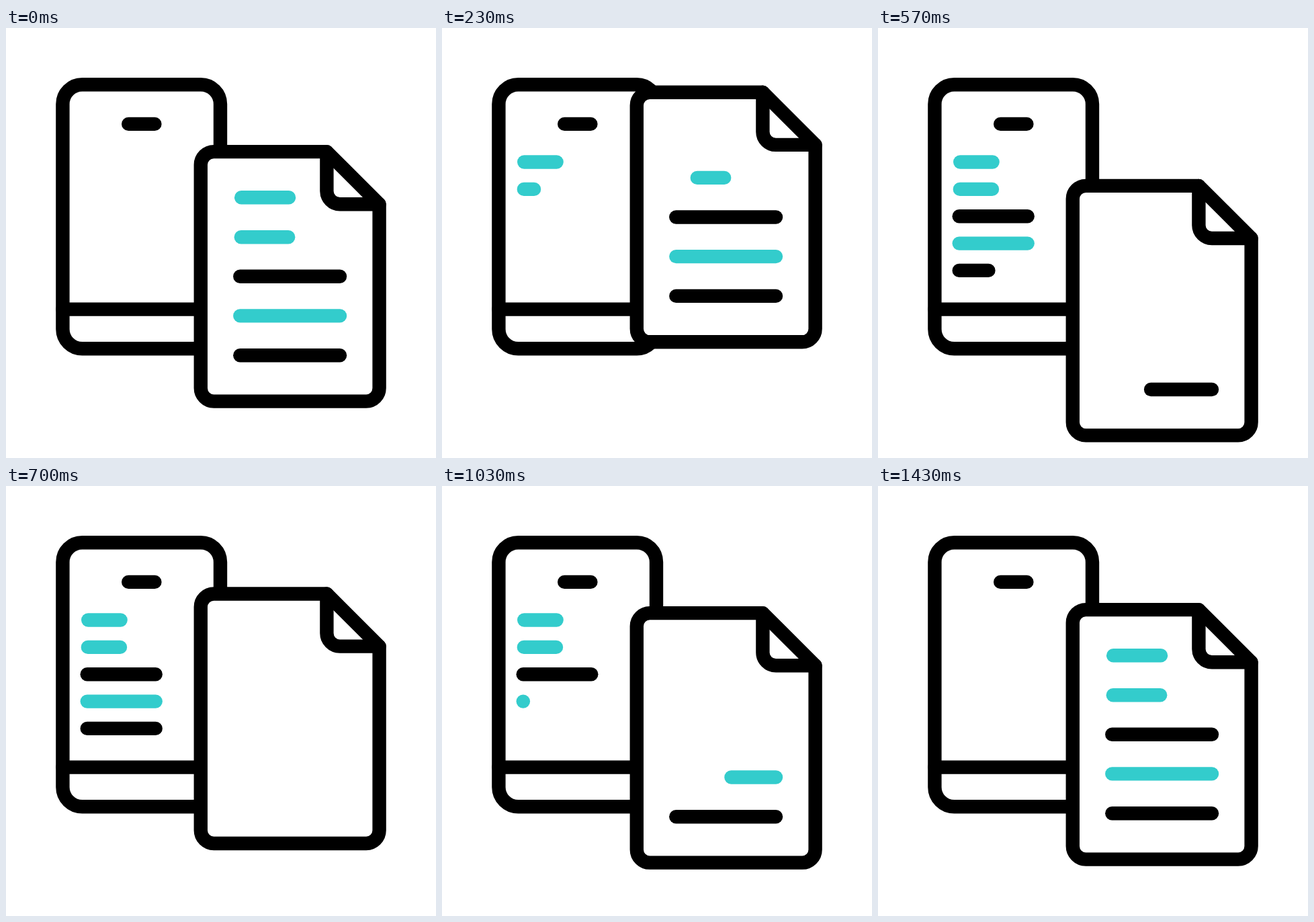
Recreate the animation shown at these times as an HTML page. Size 640 by 640 pixels, loop 1670 ms.

```html
<!DOCTYPE html>
<html lang="en">
<head>
<meta charset="utf-8">
<title>Document transfer</title>
<style>
  html, body { margin: 0; width: 100%; height: 100%; overflow: hidden; background: #fff; }
  svg { display: block; width: 100vw; height: 100vh; }
</style>
</head>
<body>
<svg viewBox="0 0 640 640" fill="none" stroke="#000" stroke-width="20.4" stroke-linecap="round" stroke-linejoin="round">
  <g id="phone">
    <rect x="84.4" y="84.3" width="234.6" height="393" rx="29"/>
    <path d="M182.2 142.9H221.4M84.4 418.6H319"/>
  </g>
  <g id="page">
    <path fill="#fff" d="M477.4 184.1H309.3A19.5 19.5 0 0 0 289.8 203.6V536.1A19.5 19.5 0 0 0 309.3 555.6H536.1A19.5 19.5 0 0 0 555.6 536.1V262.2Z"/>
    <path d="M477.4 184.1V242.7A19.5 19.5 0 0 0 496.9 262.2H555.6"/>
  </g>
</svg>
<script>
const LOOP = 1670, FRAME = 100 / 3, TRIM = 4;
const TEAL = '#33cccc', BLACK = '#000';
const phone = document.getElementById('phone');
const page = document.getElementById('page');

// Vertical bounce of the page: [frame, offset]
const bounce = [[0, 0], [7.7, -90.4], [16, 55.8], [23.9, -58.5], [35, 31.8], [43, 0]];

// Each row: colour, then [y, x1, x2, first frame out, first frame back]
const rows = [
  { color: TEAL,  doc: [252.2, 350.2, 421, 2.26, 39],      screen: [199.5, 122.2, 170.6, 2.65, 38.35] },
  { color: TEAL,  doc: [311.2, 349.8, 420.2, 5.2, 35.7],   screen: [239.9, 121.8, 170, 5.5, 34.6] },
  { color: BLACK, doc: [369.8, 348.3, 497, 8.12, 32.4],    screen: [280.3, 120.7, 222.7, 8.34, 30.85] },
  { color: TEAL,  doc: [428.4, 348.3, 497, 11.6, 29.14],   screen: [320.6, 120.7, 222.7, 11.8, 27.1] },
  { color: BLACK, doc: [487.2, 348.3, 497, 15.3, 23.88],   screen: [360.9, 120.7, 222.7, 15.19, 23.36] }
];

function addLine(parent, color) {
  const el = document.createElementNS('http://www.w3.org/2000/svg', 'path');
  el.setAttribute('stroke', color);
  parent.appendChild(el);
  return el;
}

for (const row of rows) {
  row.docLine = addLine(page, row.color);
  row.screenLine = addLine(phone, row.color);
}

function ease(u) {
  u = Math.min(1, Math.max(0, u));
  return u * u * (3 - 2 * u);
}

function offsetAt(f) {
  let y = 0;
  for (let i = 1; i < bounce.length; i++) {
    const [a, from] = bounce[i - 1], [b, to] = bounce[i];
    y += (to - from) * ease((f - a) / (b - a));
  }
  return y;
}

const moved = (f, out, back) => ease((f - out) / TRIM) - ease((f - back) / TRIM);

function drawLine(el, y, x1, x2, visible) {
  el.setAttribute('d', visible ? `M${x1} ${y}H${x2}` : '');
}

function render(ms) {
  const f = Math.floor((ms % LOOP + 3.4) / FRAME);
  page.setAttribute('transform', `translate(0 ${offsetAt(f).toFixed(3)})`);
  for (const row of rows) {
    const [dy, d1, d2, dOut, dBack] = row.doc;
    const gone = moved(f, dOut, dBack);
    drawLine(row.docLine, dy, d1 + (d2 - d1) * gone, d2, gone < 1);

    const [sy, s1, s2, sOut, sBack] = row.screen;
    const shown = moved(f, sOut, sBack);
    drawLine(row.screenLine, sy, s1, s1 + (s2 - s1) * shown, shown > 0);
  }
}

function tick(now) {
  render(now);
  requestAnimationFrame(tick);
}

render(0);
requestAnimationFrame(tick);
</script>
</body>
</html>
```
